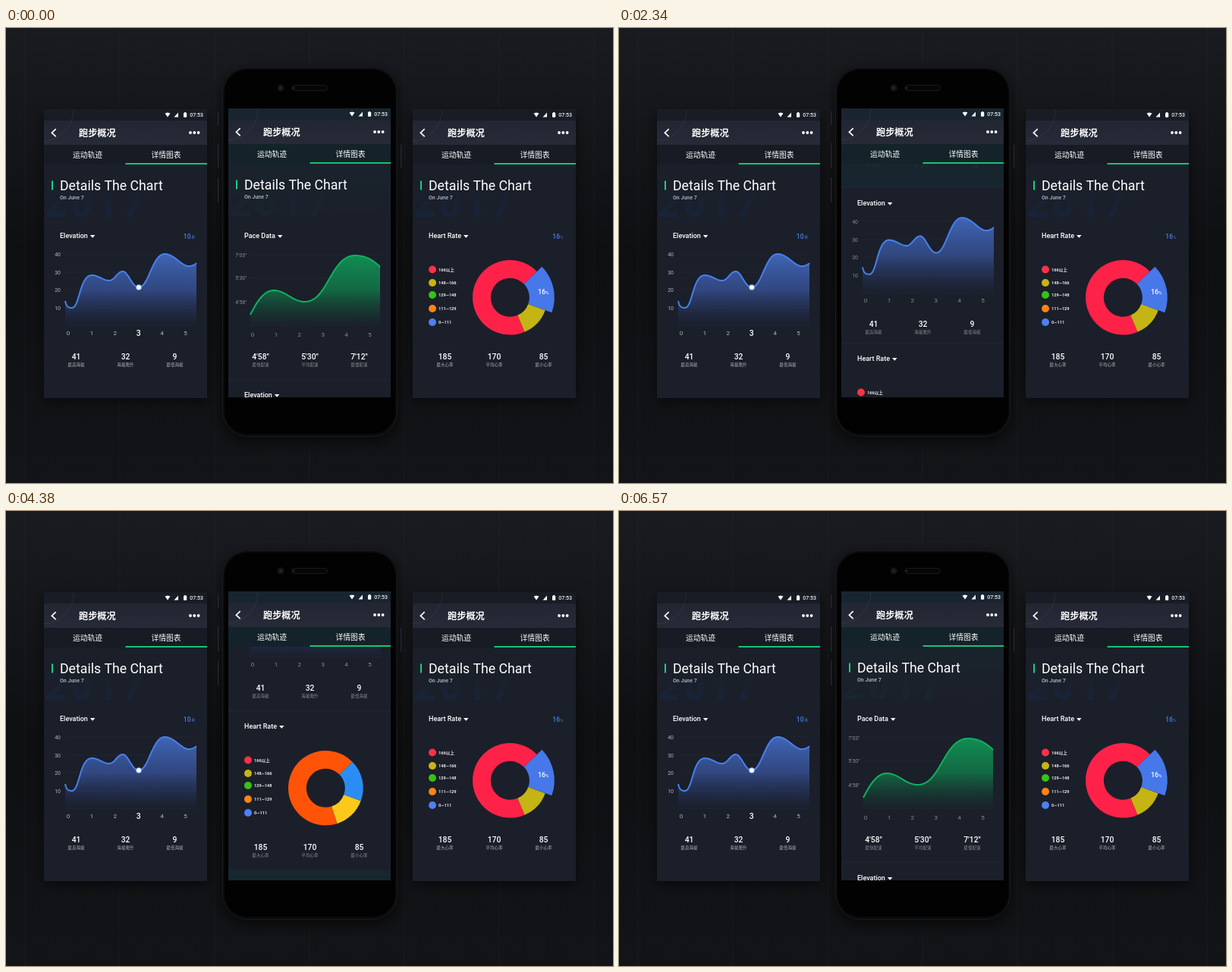
Animation, 800 px wide and 600 px high, one loop 6.6 s. Source, as an HTML page with a canvas:

```html
<!DOCTYPE html>
<html lang="zh">
<head>
<meta charset="utf-8">
<style>
  html, body { margin: 0; width: 100%; height: 100%; overflow: hidden; background: #121316; }
  canvas { display: block; width: 800px; height: 600px; }
</style>
</head>
<body>
<canvas id="stage" width="800" height="600"></canvas>
<script>
const ctx = document.getElementById('stage').getContext('2d');
const LOOP = 6600;
const FONT = 'Roboto, "Noto Sans CJK SC", "Noto Sans CJK", sans-serif';
const BLUE = '#4680ee', GREEN = '#14c873', CARD = '#1b1f2a', TEAL = '#17272f';
const COLUMNS = [42.5, 107.5, 172.5];

// ---------- helpers ----------
const clamp = v => Math.max(0, Math.min(1, v));
const ramp = (t, start, end) => clamp((t - start) / (end - start));
const mix = (a, b, p) => a + (b - a) * p;
const easeOut = p => 1 - (1 - p) ** 3;
const backOut = (p, c = 1) => 1 + (c + 1) * (p - 1) ** 3 + c * (p - 1) ** 2;

function rect(x, y, w, h, fill) {
  ctx.fillStyle = fill;
  ctx.fillRect(x, y, w, h);
}

function rounded(x, y, w, h, r, fill, stroke) {
  ctx.beginPath();
  ctx.roundRect(x, y, w, h, r);
  if (fill) { ctx.fillStyle = fill; ctx.fill(); }
  if (stroke) { ctx.strokeStyle = stroke; ctx.lineWidth = 1; ctx.stroke(); }
}

function disc(x, y, r, fill) {
  ctx.beginPath();
  ctx.arc(x, y, r, 0, 2 * Math.PI);
  ctx.fillStyle = fill;
  ctx.fill();
}

function shape(points, fill) {
  ctx.beginPath();
  points.forEach(([x, y]) => ctx.lineTo(x, y));
  ctx.fillStyle = fill;
  ctx.fill();
}

// Text whose capitals are centred vertically on y.
function text(str, x, y, size, color, weight = 400, align = 'left') {
  ctx.font = `${weight} ${size}px ${FONT}`;
  ctx.textAlign = align;
  ctx.fillStyle = color;
  ctx.fillText(str, x, y + size * 0.36);
}

function gradient(y0, y1, ...colors) {
  const g = ctx.createLinearGradient(0, y0, 0, y1);
  colors.forEach((c, i) => g.addColorStop(i / (colors.length - 1), c));
  return g;
}

function scoped(draw, alpha = 1) {
  ctx.save();
  ctx.globalAlpha *= alpha;
  draw();
  ctx.restore();
}

// Turns a start point and cubic segments into a list of points.
function curve(x, y, ...segments) {
  const points = [[x, y]];
  for (const [x1, y1, x2, y2, x3, y3] of segments) {
    for (let i = 1; i <= 24; i++) {
      const u = i / 24, v = 1 - u;
      const bezier = (a, b, c, d) => a * v ** 3 + 3 * b * u * v * v + 3 * c * u * u * v + d * u ** 3;
      points.push([bezier(x, x1, x2, x3), bezier(y, y1, y2, y3)]);
    }
    [x, y] = [x3, y3];
  }
  return points;
}

function heightAt(points, x) {
  const i = Math.max(1, points.findIndex(p => p[0] >= x));
  const [a, b] = [points[i - 1], points[i]];
  return mix(a[1], b[1], clamp((x - a[0]) / (b[0] - a[0])));
}

// ---------- charts ----------
const BASE = 118;
const elevation = {
  title: 'Elevation', line: BLUE, fill: ['rgba(70,112,205,.86)', 'rgba(60,92,172,.66)', 'rgba(40,60,120,.04)'],
  rows: [['40', 24], ['30', 48], ['20', 71], ['10', 95]], rowX: 22, axisY: 128.5,
  values: ['41', '32', '9'], labels: ['最高海拔', '海拔爬升', '最低海拔'],
  points: curve(28, 86, [29.5, 93, 32, 95, 37, 95], [47, 95, 47, 52, 63, 52], [72, 52, 78, 59, 86, 59],
    [93, 59, 97, 47, 104, 47], [111, 47, 116, 68, 125, 68], [138, 68, 143, 24, 159, 24],
    [172, 24, 181, 40, 191, 40], [195, 40, 199, 38, 201, 36])
};
const pace = {
  title: 'Pace Data', line: '#10b060', fill: ['rgba(16,155,88,.9)', 'rgba(16,130,76,.75)', 'rgba(14,80,56,.06)'],
  bright: ['rgba(10,190,95,.5)', 'rgba(10,160,85,.42)', 'rgba(10,120,70,0)'],
  rows: [["7'03\"", 25.5], ["5'30\"", 55.5], ["4'58\"", 87.5]], rowX: 24.5, axisY: 130,
  values: ["4'58\"", "5'30\"", "7'12\""], labels: ['最快配速', '平均配速', '最慢配速'],
  points: curve(29, 104, [39, 84, 48, 72, 60, 72], [76, 72, 84, 87, 101, 87],
    [131, 87, 135, 26, 167, 26], [180, 26, 190, 31, 200, 41])
};
const heart = {
  title: 'Heart Rate',
  values: ['185', '170', '85'], labels: ['最大心率', '平均心率', '最小心率'],
  legend: [['#ff3048', '166以上', 44.5], ['#c8b416', '148—166', 62], ['#34c316', '129—148', 78],
    ['#ff8414', '111—129', 96], ['#4c80f4', '0—111', 114]]
};

function areaPath(points) {
  ctx.beginPath();
  ctx.moveTo(points[0][0], BASE);
  points.forEach(([x, y]) => ctx.lineTo(x, y));
  ctx.lineTo(points[points.length - 1][0], BASE);
}

function drawArea(chart, grow, brightTo) {
  if (grow <= 0) return;
  const points = chart.points.map(([x, y]) => [x, BASE + (y - BASE) * grow]);
  const top = BASE - 94 * grow;
  areaPath(points);
  ctx.fillStyle = gradient(top, BASE, ...chart.fill);
  ctx.fill();
  if (brightTo) scoped(() => {
    ctx.beginPath();
    ctx.rect(0, 0, brightTo, BASE);
    ctx.clip();
    areaPath(points);
    ctx.fillStyle = gradient(top, BASE, ...chart.bright);
    ctx.fill();
  });
  ctx.beginPath();
  points.forEach(([x, y]) => ctx.lineTo(x, y));
  ctx.strokeStyle = chart.line;
  ctx.lineWidth = 2;
  ctx.stroke();
}

function marker(x, y, ring) {
  disc(x, y, 3.8, ring);
  disc(x, y, 2.8, '#fff');
}

function drawAxes(chart, selected, look) {
  for (const [label, y] of chart.rows) {
    rect(28, y - 0.5, 173, 1, 'rgba(255,255,255,.022)');
    text(label, chart.rowX, y, 7, look.axis, 400, 'right');
  }
  rect(28, BASE, 173, 1, 'rgba(255,255,255,.022)');
  for (let i = 0; i < 6; i++) {
    const on = i === selected;
    text(i, 32 + i * 30.9, chart.axisY, on ? 10.5 : 8, on ? '#fff' : look.axis, on ? 500 : 400, 'center');
  }
}

function ringSlice(from, to, outer, fill) {
  if (to <= from) return;
  const rad = Math.PI / 180;
  ctx.beginPath();
  ctx.arc(128.3, 81.3, outer, from * rad, to * rad);
  ctx.arc(128.3, 81.3, 25.5, to * rad, from * rad, true);
  ctx.fillStyle = fill;
  ctx.fill();
}

function drawDonut({ sweep = 1, pop = 0 }, { ring, ringStart }) {
  const end = ringStart + 360 * sweep;
  ringSlice(ringStart, Math.min(end, 316), 49.3, ring[0]);
  ringSlice(380, Math.min(end, 360 + ringStart), 49.3, ring[2]);
  ringSlice(316, Math.min(end, 380), mix(49.3, 58.5, pop), ring[1]);
  if (pop > 0) scoped(() => {
    text('16', 165, 74, 9, '#fff', 500);
    text('%', 175, 75, 6, '#fff', 500);
    text('16', 194, 1, 8.5, BLUE, 500, 'right');
    text('%', 194.5, 2, 5, BLUE);
  }, clamp(pop));
}

function drawCard(chart, x, y, state, look) {
  const { values = 1, labels = 1 } = state;
  ctx.save();
  ctx.translate(x, y);
  text(chart.title, 21, 0, 9, '#fff', 500);
  const caret = 24 + ctx.measureText(chart.title).width;
  shape([[caret, -1], [caret + 6.5, -1], [caret + 3.25, 2.8]], '#fff');
  if (chart.points) {
    drawAxes(chart, state.selected, look);
    drawArea(chart, state.grow, state.brightTo);
  } else {
    for (const [color, label, ly] of chart.legend) {
      disc(26, ly, 5, color);
      text(label, 34, ly, 5.6, '#e8e9ec', 700);
    }
    drawDonut(state, look);
  }
  if (state.overlay) state.overlay();
  chart.values.forEach((value, i) => {
    const shown = /'/.test(value) ? value : Math.round(value * values);
    scoped(() => text(shown, COLUMNS[i], 159, 10.3, '#fff', 500, 'center'), clamp(values * 2));
    scoped(() => text(chart.labels[i], COLUMNS[i], 170, 5.6, look.label, 400, 'center'), labels);
  });
  ctx.restore();
}

// ---------- app chrome ----------
function drawHeading(x, y, ghost) {
  ctx.save();
  ctx.translate(x, y);
  ctx.letterSpacing = '5px';
  text('2017', 1, 123, 50, gradient(104, 141, `rgba(${ghost},0)`, `rgba(${ghost},.8)`), 900);
  ctx.letterSpacing = '0px';
  rect(10, 93.5, 2, 12, '#18d080');
  text('Details The Chart', 21, 99.5, 17.7, '#fff');
  text('On June 7', 21, 115.5, 7, '#a4a7af', 700);
  ctx.restore();
}

function drawNav(x, y, look) {
  ctx.save();
  ctx.translate(x, y);
  ctx.beginPath();
  ctx.rect(0, -1, 215, 73);
  ctx.clip();
  rect(0, -1, 215, 15, look.status);
  rect(0, 14, 215, 32, gradient(14, 46, '#222632', '#272b37'));
  rect(0, 46, 215, 26, look.tabs);
  ctx.beginPath();
  ctx.arc(-2, 0, 41, 0, 2);
  ctx.strokeStyle = 'rgba(255,255,255,.06)';
  ctx.lineWidth = 1;
  ctx.stroke();

  shape([[159.5, 4.5], [163, 3.5], [166.5, 4.5], [163, 9.5]], '#fff');
  shape([[171.5, 9.5], [177, 3.5], [177, 9.5]], '#fff');
  rounded(184, 3.8, 4.2, 5.9, 0.7, '#fff');
  rect(185.2, 3, 1.8, 1, '#fff');
  text('07:53', 210, 6.5, 7, '#eee', 500, 'right');

  ctx.beginPath();
  [[15.7, 25.2], [10.4, 30.2], [15.7, 35.2]].forEach(p => ctx.lineTo(...p));
  ctx.strokeStyle = '#fff';
  ctx.lineWidth = 1.7;
  ctx.stroke();
  text('跑步概况', 46, 30.3, 12.2, '#fff', 700);
  [193, 198.3, 203.6].forEach(dx => disc(dx, 30, 1.9, '#fff'));

  text('运动轨迹', 57.5, 59.5, 9.8, '#fff', 500, 'center');
  text('详情图表', 161, 59.5, 9.8, '#fff', 500, 'center');
  rect(107.5, 70, 107.5, 2, '#16c472');
  ctx.restore();
}

const sideLook = { status: '#181c25', tabs: '#171b24', axis: '#b4b7be', label: '#aeb1b8',
  ring: ['#ff2248', '#4678ea', '#c4b414'], ringStart: 67 };
const phoneLook = { status: '#182530', tabs: '#14232a', axis: '#888c95', label: '#868a93',
  ring: ['#ff5408', '#2b8df4', '#fbc91c'], ringStart: 72 };

function drawSidePanel(x, chart, state) {
  scoped(() => {
    ctx.shadowColor = 'rgba(0,0,0,.5)';
    ctx.shadowBlur = 14;
    ctx.shadowOffsetY = 5;
    rect(x, 108, 215, 380, CARD);
  });
  drawHeading(x, 108, '23,37,60');
  drawNav(x, 108, sideLook);
  drawCard(chart, x, 274, state, sideLook);
}

// ---------- backdrop and device ----------
function drawBackdrop() {
  rect(0, 0, 800, 600, gradient(0, 600, '#1a1b20', '#0e0f11', '#131417'));
  for (let x = 24.5; x < 800; x += 125) rect(x, 0, 1, 600, 'rgba(255,255,255,.035)');
}

function drawDevice() {
  [[279, 110, 18], [279, 152, 33], [279, 197, 33], [520, 154, 31]]
    .forEach(([x, y, h]) => rect(x, y, 1.3, h, '#303237'));
  scoped(() => {
    ctx.shadowColor = 'rgba(0,0,0,.6)';
    ctx.shadowBlur = 18;
    ctx.shadowOffsetY = 6;
    rounded(285, 52, 231, 487, 33, '#0a0a0b');
  });
  rounded(285.5, 52.5, 230, 486, 33, null, '#1b1c1e');
  rounded(288, 55, 225, 480, 30, '#020202');
  disc(362, 79, 4.5, '#131417');
  disc(362, 79, 2, '#20232b');
  rounded(376.5, 75.5, 47, 7, 3.5, '#060607', '#18191b');
  disc(379, 79, 1.5, '#242529');
}

// ---------- scrolling screen ----------
// Sections below the leading one follow it with a small delay.
const scrolls = [{ at: 1260, leader: 2 }, { at: 2880, leader: 2 }, { at: 5280, leader: 0 }];
const stops = [0, 253, 410, 0];
const heartStops = [0, 258, 410, 0];

function scrollOf(section, t) {
  const list = section === 3 ? heartStops : stops;
  let k = -1;
  scrolls.forEach((s, i) => { if (t >= s.at) k = i; });
  if (k < 0) return list[0];
  const start = scrolls[k].at + 54 * Math.max(0, section - scrolls[k].leader);
  return mix(list[k], list[k + 1], backOut(ramp(t, start, start + 480)));
}

function paceOverlay(t) {
  if (t <= 120 || t > 5280) return {};
  const p = easeOut(ramp(t, 120, 960));
  const x = mix(29, 169.3, p);
  return {
    brightTo: x,
    overlay() {
      marker(x, heightAt(pace.points, x), '#2bd184');
      const seconds = Math.round(mix(288, 413, p));
      const value = `${Math.floor(seconds / 60)}'${String(seconds % 60).padStart(2, '0')}"`;
      scoped(() => {
        text(value, 174.5, 0.8, 8.7, GREEN, 500, 'right');
        text('分钟/公里', 175.5, 1.5, 5.4, GREEN);
      }, ramp(t, 120, 360));
    }
  };
}

function drawScreen(t) {
  const X = 293;
  const revealed = t < 5280 ? 1 : easeOut(ramp(t, 6060, 6480));
  const paceAlpha = t < 5280 ? mix(1, 0.04, ramp(t, 1260, 1640)) : ramp(t, 5280, 5460);
  const sections = [
    { chart: pace, top: 274, alpha: paceAlpha,
      state: { grow: revealed, values: revealed, labels: revealed, ...paceOverlay(t) } },
    { chart: elevation, top: 484, alpha: 1,
      state: { grow: t < 1960 ? 0 : backOut(ramp(t, 1960, 2430), 2), values: ramp(t, 1700, 1900) } },
    { chart: heart, top: 694, alpha: 1,
      state: { sweep: 1 - (1 - ramp(t, 3300, 3960)) ** 2, values: easeOut(ramp(t, 3540, 3960)),
        pop: t <= 4380 ? 0 : backOut(ramp(t, 4380, 4770), 1.4) } }
  ];

  ctx.save();
  ctx.beginPath();
  ctx.rect(X, 106, 214, 381);
  ctx.clip();
  rect(X, 106, 214, 381, TEAL);
  const headShift = scrollOf(0, t);
  rect(X, 106 - headShift, 214, 147, CARD);
  rect(X, 180 - headShift, 214, 73, gradient(180 - headShift, 253 - headShift, '#1a232d', CARD));
  drawHeading(X, 107 - headShift, '24,39,48');
  sections.forEach(({ chart, top, alpha, state }, i) => {
    const y = top - scrollOf(i + 1, t);
    scoped(() => {
      rect(X, y - 21, 214, 210, CARD);
      if (i) rect(X, y - 21, 214, 1, '#202632');
      drawCard(chart, X, y, state, phoneLook);
    }, alpha);
  });
  drawNav(X, 107, phoneLook);
  ctx.restore();
}

function frame() {
  const t = performance.now() % LOOP;
  drawBackdrop();
  drawSidePanel(50, elevation, { grow: 1, selected: 3, overlay() {
    marker(125, 68, '#8fadf2');
    text('10', 193.5, 1, 8.5, BLUE, 500, 'right');
    text('米', 194.3, 1.5, 5, BLUE);
  } });
  drawSidePanel(536, heart, { pop: 1 });
  drawDevice();
  drawScreen(t);
  requestAnimationFrame(frame);
}
frame();
</script>
</body>
</html>
```
